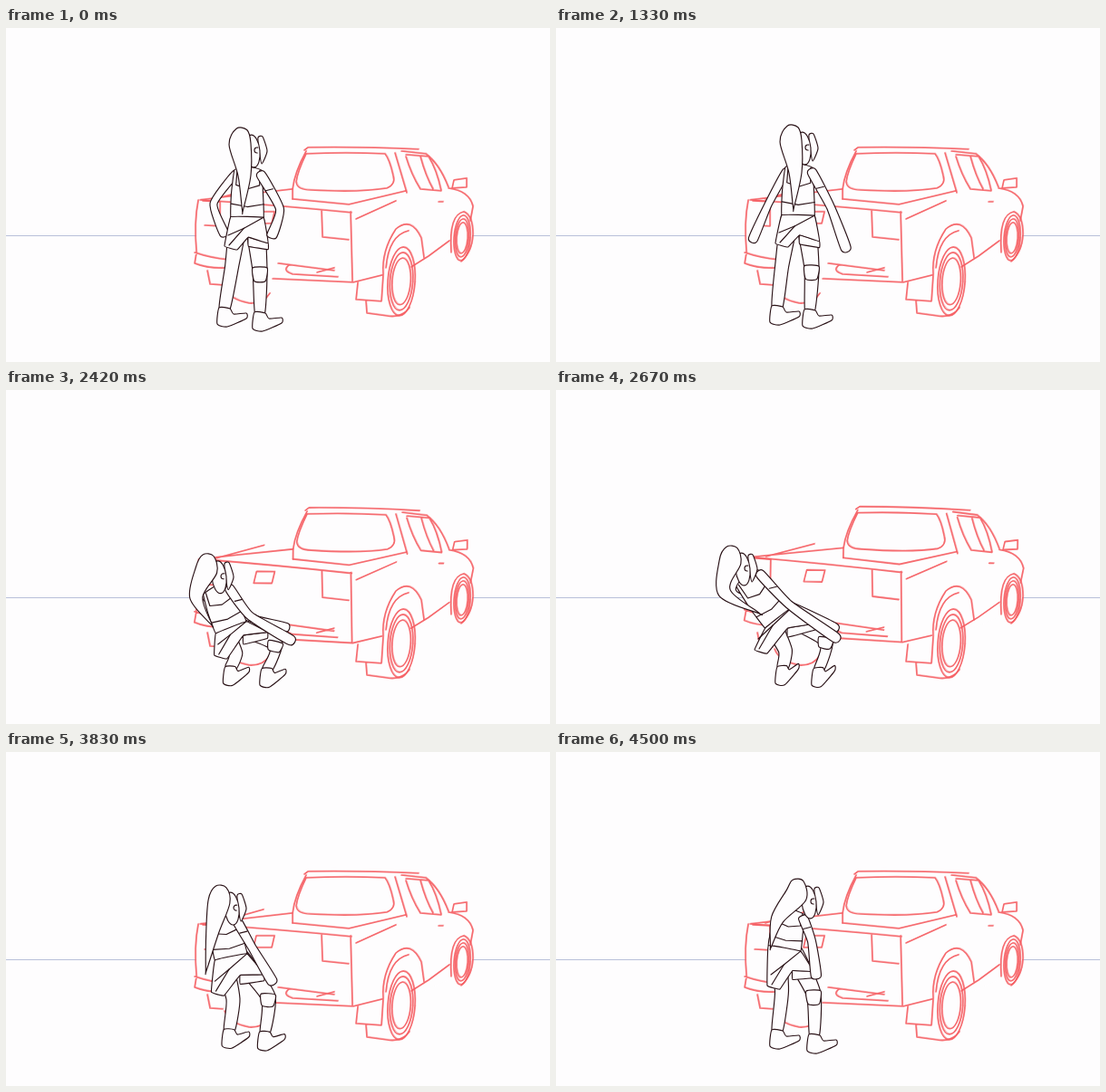
An HTML page with a canvas for the animation above (4.58 s loop, 600 by 369 pixels).

```html
<!DOCTYPE html>
<html lang="en">
<head>
<meta charset="utf-8">
<title>Lifting the truck</title>
<style>
html, body { margin: 0; height: 100%; overflow: hidden; background: #fefdfe; }
canvas { display: block; width: 600px; height: 369px; }
</style>
</head>
<body>
<canvas id="stage" width="600" height="369"></canvas>
<script>
const ctx = document.getElementById('stage').getContext('2d');
const PAPER = '#fefdfe', INK = '#2a1217', RED = '#f65f63';
const FPS = 12, LOOP = 4580;

const add = (p, x, y) => [p[0] + x, p[1] + y];
const mix = (a, b, t) => a.map((v, i) => v + (b[i] - v) * t);
function unit(a, b) {
  const x = b[0] - a[0], y = b[1] - a[1], d = Math.hypot(x, y) || 1;
  return [x / d, y / d];
}

// ---------- truck ----------
const shell = new Path2D('M212 190L316 177L331 132L455 135L490 175L514 190V240L452 268L383 281L300 278L208 262Z');
const body = [
  // cab and rear window
  'M329 135L333 132Q390 131 455 134M331 136Q318 160 316 178V189M331 139Q321 160 320 170Q321 179 336 179Q390 182 420 177Q430 173 427 163Q423 145 418 139Q375 137 331 139M429 138L442 182',
  // side windows, mirror, bonnet
  'M436 136L463 139Q478 150 488 176M441 142Q447 162 457 178L480 180Q475 156 466 142L441 140M457 142Q463 164 471 178M494 168L508 166V176L492 177ZM488 177Q511 180 515 197L512 213M477 192h5',
  // bed and tailgate
  'M214 190L255 185L316 178M316 189L378 195L441 180M214 190Q300 196 381 204M212 190Q207 215 210 247M380 203L382 280M386 211L430 191M231 189L284 174',
  // lights and handle
  'M348 202L349 231L378 234M217 191L236 192V219L219 218M276 203h20l-3 13h-20z',
  // bumper and sill
  'M208 248Q225 254 245 256M210 248L208 260Q222 266 244 265M294 277L383 281L415 273M300 260L362 268M312 262Q304 268 316 272L366 275M343 270L362 265M447 264L466 252L489 235'
].map(d => new Path2D(d));
const chassis = new Path2D('M388 281L386 300L414 302L416 272Q414 246 430 222Q447 208 458 232L461 254M397 302L398 315L420 318Q436 321 445 309M491 248Q488 206 505 203Q515 207 515 228Q514 248 502 258M222 268L225 283L239 284M241 286Q246 300 268 304Q284 305 291 293M419 265Q422 229 444 224');

// each red line is drawn firmly, then once more lightly beside itself
function pencil(line) {
  ctx.strokeStyle = RED;
  for (const [offset, width, alpha] of [[0, 1.6, .9], [.8, .9, .45]]) {
    ctx.save();
    ctx.translate(offset, -offset);
    ctx.lineWidth = width;
    ctx.globalAlpha = alpha;
    ctx.stroke(line);
    ctx.restore();
  }
}
function wheel(x, y, rx, ry) {
  for (const r of [1, .84, .68]) {
    const ring = new Path2D();
    ring.ellipse(x, y, rx * r, ry * r, .07, 0, 7);
    pencil(ring);
  }
}
function drawTruck(lift) {
  ctx.save();
  ctx.translate(515, 230);
  ctx.rotate(lift * Math.PI / 180);
  ctx.translate(-515, -230);
  ctx.fillStyle = PAPER;
  ctx.fill(shell);
  body.forEach(pencil);
  ctx.restore();
  pencil(chassis);
  wheel(436, 280, 15, 38);
  wheel(503, 232, 9, 25);
}

// ---------- key poses: joints of the figure ----------
const hips = {
  head: [258, 128], hair: [263, 163], tip: [261, 201],
  chest: [267, 157], waist: [266, 209], flap: [241, 241],
  elbowL: [229, 194], handL: [241, 228], elbowR: [302, 200], handR: [293, 230],
  kneeL: [249, 264], ankleL: [241, 310], kneeR: [280, 268], ankleR: [280, 315],
  toe: [0], lift: [0]
};
const raise = (p, x, y) => Object.fromEntries(Object.entries(p).map(([k, v]) =>
  [k, v.length < 2 || /knee|ankle/.test(k) ? v : add(v, x, y)]));
const blend = (a, b, t) =>
  Object.fromEntries(Object.keys(a).map(k => [k, mix(a[k], b[k], t)]));

const tall = raise(hips, 2, -3);
const sway = { ...tall, flap: add(tall.flap, 3, 2) };
const armsOut = {
  ...raise(hips, 1, -3), waist: [267, 207],
  elbowL: [234, 195], handL: [217, 234], elbowR: [303, 198], handR: [320, 244],
  ankleL: [244, 308], kneeR: [282, 266], ankleR: [280, 312]
};
const crouch = {
  ...armsOut, head: [265, 212], hair: [246, 238], tip: [232, 278],
  chest: [263, 239], waist: [253, 278], flap: [246, 302],
  elbowL: [284, 272], handL: [312, 262], elbowR: [287, 268], handR: [324, 281],
  kneeL: [254, 297], ankleL: [244, 307], kneeR: [297, 288], ankleR: [285, 309]
};
const heave = {
  ...crouch, head: [192, 190], hair: [186, 224], tip: [223, 246],
  chest: [211, 208], waist: [245, 252], flap: [219, 287],
  elbowL: [258, 238], handL: [308, 263], elbowR: [257, 237], handR: [309, 274],
  kneeL: [253, 288], ankleL: [250, 307], kneeR: [298, 277], ankleR: [290, 309],
  toe: [.4], lift: [1]
};
const hang = { ...heave, hair: [184, 222], tip: [184, 270] };
const rise = {
  ...armsOut, head: [261, 150], hair: [254, 185], tip: [243, 223],
  chest: [257, 171], waist: [250, 211], flap: [231, 252],
  elbowL: [239, 190], handL: [238, 208], elbowR: [280, 203], handR: [285, 242],
  kneeR: [284, 267], ankleR: [283, 311]
};
const bend = {
  ...raise(rise, 2, 6), head: [265, 158], hair: [244, 185], tip: [237, 215],
  ankleR: [285, 313]
};

// first frame, last frame, pose reached
const KEYS = [
  [0, 0, hips], [1, 4, tall], [10, 11, sway], [14, 14, armsOut], [19, 19, crouch],
  [24, 26, blend(crouch, heave, .1)], [28, 32, heave], [34, 38, hang],
  [41, 41, { ...hang, lift: [.8] }], [42, 42, hang],
  [43, 43, { ...blend(hang, rise, .28), lift: [0] }], [46, 48, rise],
  [50, 52, blend(rise, hips, .27)], [54, 54, bend]
];
function poseAt(frame) {
  const i = KEYS.findLastIndex(k => k[0] <= frame);
  const [first, last, to] = KEYS[i];
  const p = Math.min(1, (frame - first + 1) / (last - first + 1));
  return blend(KEYS[Math.max(0, i - 1)][2], to, 1 - (1 - p) ** 1.6);
}

// ---------- figure drawing ----------
function line(...p) {
  ctx.beginPath();
  p.forEach(q => ctx.lineTo(...q));
  ctx.stroke();
}
function shape(p, k = .1) {
  const at = i => p[(i + p.length) % p.length];
  ctx.beginPath();
  ctx.moveTo(...p[0]);
  p.forEach((b, i) => {
    const a = at(i - 1), c = at(i + 1), d = at(i + 2);
    ctx.bezierCurveTo(b[0] + (c[0] - a[0]) * k, b[1] + (c[1] - a[1]) * k,
      c[0] - (d[0] - b[0]) * k, c[1] - (d[1] - b[1]) * k, ...c);
  });
  ctx.fill();
  ctx.stroke();
}
// outline around a chain of joints, with a half width at each
function tube(joints, widths, k) {
  const side = s => joints.map((p, i) => {
    const [x, y] = unit(joints[Math.max(0, i - 1)], joints[Math.min(joints.length - 1, i + 1)]);
    return add(p, -y * s * widths[i], x * s * widths[i]);
  });
  shape([...side(1), ...side(-1).reverse()], k);
}
const BOOT = [[-6, -1], [-8, 17], [3, 20], [24, 11], [24, 5], [10, 6], [6, 0]];
const TUFT = [[6, -15], [11, -16], [16, 0], [10, 14], [7, -2]];

function boot(ankle, toe) {
  shape(BOOT.map(([x, y]) => {
    const front = Math.max(0, x);
    return add(ankle, x - front * toe * .7, y - front * toe);
  }));
}

function drawFigure(p) {
  ctx.strokeStyle = INK;
  ctx.fillStyle = PAPER;
  ctx.lineWidth = 1.15;
  const [x, y] = unit(p.chest, p.waist);
  // a point on the back: part of the way down, and to one side
  const back = (down, side) => add(mix(p.chest, p.waist, down), y * side, -x * side);
  const toe = p.toe[0];

  tube([back(1, -9), p.kneeL, p.ankleL], [9, 7.5, 6]);
  boot(p.ankleL, toe);
  tube([back(1, 8), p.kneeR, p.ankleR], [10, 8, 5.5]);
  tube([add(p.kneeR, 0, -3), mix(p.kneeR, p.ankleR, .25)], [8, 6]);
  boot(p.ankleR, toe);

  tube([back(.08, -14), p.elbowL, p.handL], [4, 4, 5]);
  shape([back(0, -15), back(.5, -18), back(1, -18), back(1.05, 0), back(1, 18),
    back(.5, 17), back(0, 15), back(-.08, 0)], .05);
  line(back(0, -12), back(.32, -13), back(.4, 0), back(.32, 13), back(0, 13));
  line(back(.72, -18), back(.78, 0), back(.72, 18));

  const waistL = back(1, -18), waistR = back(1, 18);
  const hem = add(mix(waistR, p.kneeR, .5), 7, -1);
  const slit = add(mix(p.flap, hem, .55), 0, -8);
  shape([slit, hem, add(hem, 0, 7), add(slit, 0, 10)], .03);
  shape([waistL, p.flap, add(p.flap, 14, 4), slit, hem, waistR], .03);
  line(waistR, add(mix(waistR, p.flap, .5), 0, -4), add(p.flap, 5, -1));
  line(add(mix(waistR, p.flap, .5), 0, -4), add(p.flap, 4, -12));

  const shoulder = back(.08, 14);
  tube([shoulder, p.elbowR, p.handR], [5, 4.5, 5.5]);
  const arm = mix(shoulder, p.elbowR, .45);
  line(add(arm, -4, 1), add(arm, 4, -1));

  const face = add(p.head, 14, 8);
  shape(TUFT.map(q => add(face, ...q)));
  ctx.beginPath();
  ctx.ellipse(...face, 8, 18, -.1, 0, 7);
  ctx.fill();
  ctx.stroke();
  ctx.beginPath();
  ctx.arc(face[0] + 5, face[1] - 1, 3, 1.5, 5);
  ctx.stroke();
  tube([add(p.head, 2, -16), p.head, p.hair, p.tip], [6, 12, 7, .5], .16);
}

function draw(t) {
  const p = poseAt(Math.floor((t % LOOP + 4) / 1000 * FPS));
  ctx.fillStyle = PAPER;
  ctx.fillRect(0, 0, 600, 369);
  ctx.fillStyle = '#b9c0da';
  ctx.fillRect(0, 229, 600, 1);
  ctx.lineCap = ctx.lineJoin = 'round';
  drawTruck(p.lift[0]);
  drawFigure(p);
}

const start = performance.now();
function tick() {
  draw(performance.now() - start);
  requestAnimationFrame(tick);
}
tick();
</script>
</body>
</html>
```
